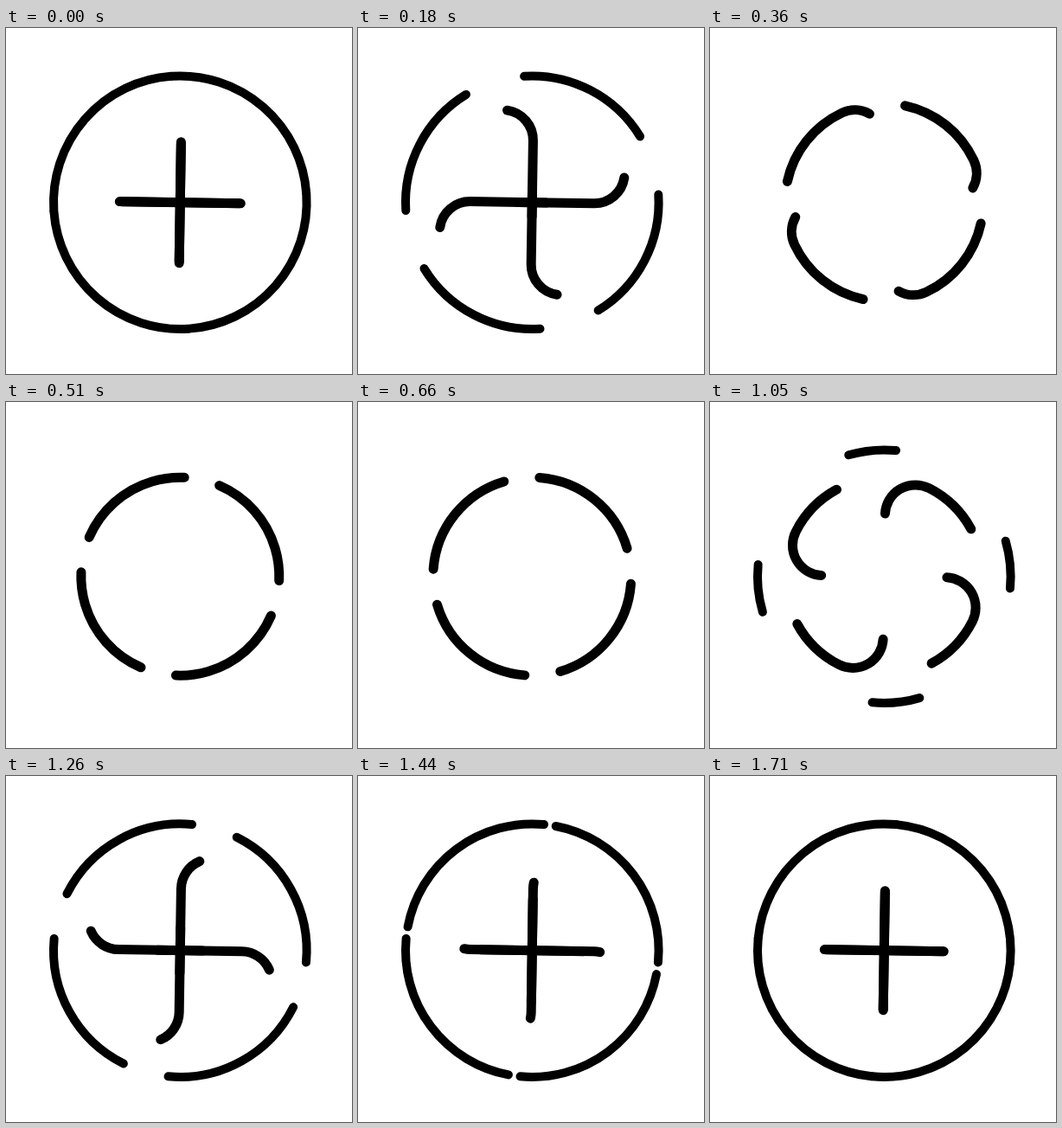
An HTML page for the animation above (3.86 s loop, 400x400 px).

```html
<!DOCTYPE html>
<html lang="en">
<head>
<meta charset="utf-8">
<title>Plus loader</title>
<style>
  html, body { margin: 0; width: 100%; height: 100%; overflow: hidden; background: #fff; }
  svg { display: block; width: 100vw; height: 100vh; }
  path { fill: none; stroke: #000; stroke-linecap: round; }
  #stroke { stroke-width: 11; }
  #ring { stroke-width: 10; }
</style>
</head>
<body>
<svg viewBox="0 0 400 400">
  <g transform="translate(201.3 201.7) rotate(.9)">
    <g id="quarter">
      <path id="stroke"/>
      <path id="ring"/>
    </g>
    <use href="#quarter" transform="rotate(90)"/>
    <use href="#quarter" transform="rotate(180)"/>
    <use href="#quarter" transform="rotate(270)"/>
  </g>
</svg>
<script>
  const LOOP = 3860, TICK = 30;
  const ORBIT = 114.5, FILLET = 35, RING = 146.3, HALF = 69;
  const SEAM = 4.5; // degrees between the ring's seams and the arms

  const stroke = document.getElementById('stroke');
  const ring = document.getElementById('ring');

  // Angles are in degrees, clockwise from the top.
  const point = (radius, angle) => {
    const a = angle * Math.PI / 180;
    return `${radius * Math.sin(a)} ${-radius * Math.cos(a)}`;
  };
  const arcTo = (radius, end) => `A${radius} ${radius} 0 0 0 ${end}`;

  // Out along an arm, round the orbit counter-clockwise, back in along the opposite arm.
  const arm = Math.sqrt((ORBIT - FILLET) ** 2 - FILLET ** 2);
  const tangent = 90 - Math.atan2(FILLET, arm) * 180 / Math.PI;
  const sweep = 2 * tangent + 360;
  const orbitArcs = [1, 2, 3].map(i => arcTo(ORBIT, point(ORBIT, tangent - sweep * i / 3)));
  stroke.setAttribute('d', [
    `M${-HALF} 0H${arm}`,
    arcTo(FILLET, point(ORBIT, tangent)),
    ...orbitArcs,
    arcTo(FILLET, `${-arm} 0`),
    `H${HALF}`
  ].join(''));
  stroke.setAttribute('stroke-dasharray', `${2 * HALF} 3000`);
  const total = stroke.getTotalLength() - 2 * HALF;

  // Time in ms, distance travelled, speed.
  const keys = [
    [0, 1, .08], [360, 178, .9], [660, 553, 1.7], [810, 839, 1.69],
    [1050, 1116, .71], [1260, 1215, .28], [1710, total - .6, .01]
  ];

  function travel(time) {
    const next = keys.findIndex(key => time < key[0]);
    if (next < 0) return keys[keys.length - 1][1];
    const [t0, x0, v0] = keys[next - 1], [t1, x1, v1] = keys[next];
    const span = t1 - t0, u = (time - t0) / span, w = 1 - u;
    return x0 * w * w * (1 + 2 * u) + x1 * u * u * (1 + 2 * w)
      + span * u * w * (v0 * w - v1 * u);
  }

  function drawRing(from, to) {
    ring.setAttribute('d', from > to ? `M${point(RING, from)}${arcTo(RING, point(RING, to))}` : '');
  }

  function frame() {
    const time = Math.floor((performance.now() % LOOP + 6) / TICK) * TICK % LOOP;
    const x = travel(time);
    stroke.setAttribute('stroke-dashoffset', -x);
    if (x < total / 2) drawRing(90 * (1 - x / 170) - SEAM, -SEAM);
    else drawRing(SEAM, SEAM - 90 * (1 - (total - x) / 189));
    requestAnimationFrame(frame);
  }
  frame();
</script>
</body>
</html>
```
